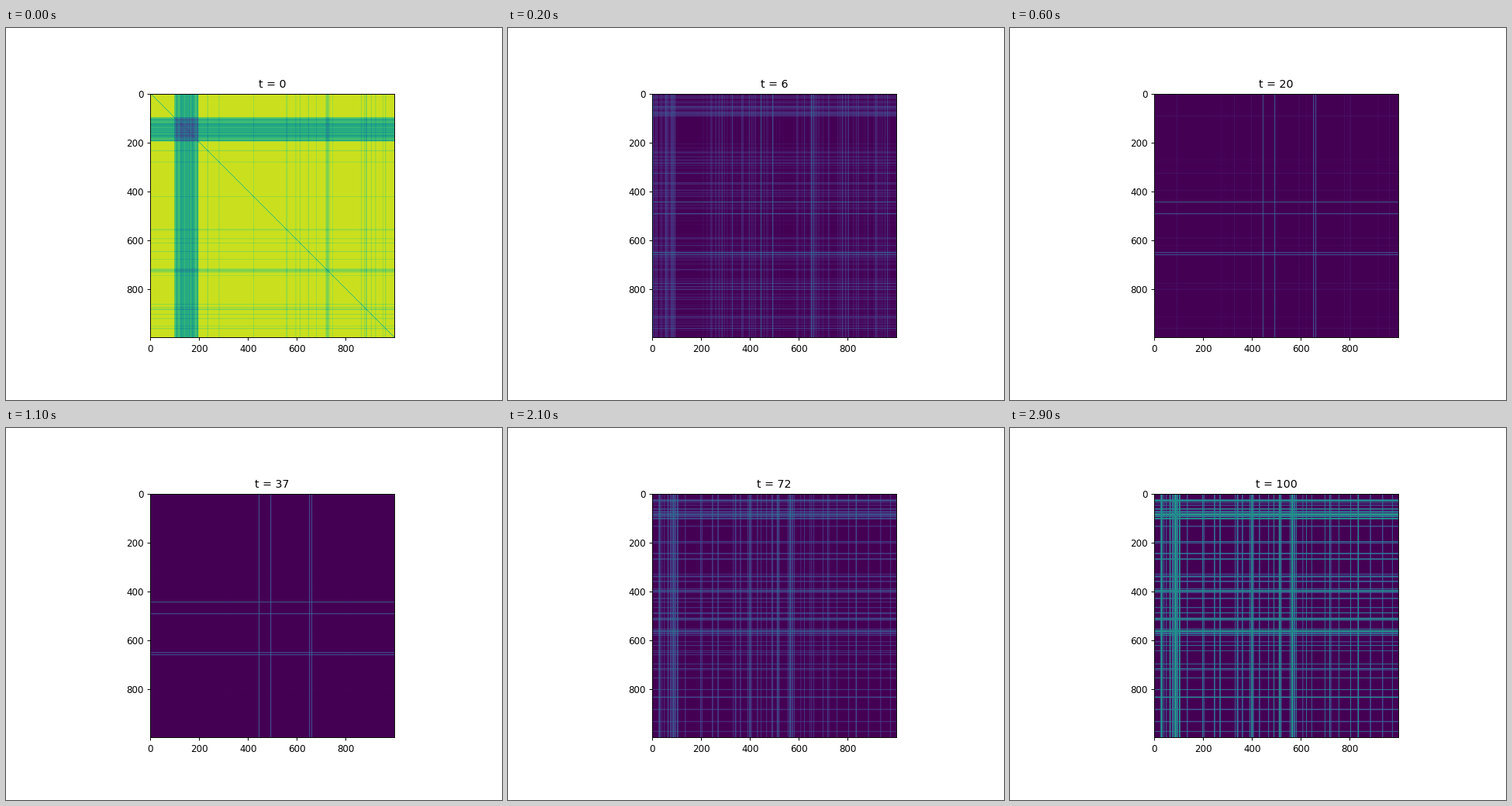
A matplotlib script that plays this animation: 640x480 px, repeating every 3000 ms.

```python
import numpy as np
import matplotlib.pyplot as plt
from matplotlib.animation import FuncAnimation

W, H, DPI = 640, 480, 100
N, FRAMES, INTERVAL = 1000, 30, 100
LEFT, BOTTOM, SIDE = 186.3, 80.7, 314.7  # axes box in pixels
SCALE = 0.853  # text and tick size relative to the defaults
cells = np.arange(N)
rng = np.random.default_rng(7)


def bump(centre, width):
    return np.exp(-((cells - centre) / width) ** 2)


def start_levels():
    """High everywhere, with a low block and a few sparse dips."""
    chance = 0.03 * (cells > 200) + 0.2 * bump(725, 12) + 0.1 * bump(285, 8)
    dips = rng.random(N) < chance
    vec = np.where(dips, rng.uniform(0.1, 0.3, N), 0.46)
    vec[100:197] = rng.uniform(0.0, 0.36, 97)
    return vec


def decay_times():
    """Most cells die out at once, a few last, four never fade."""
    scale = 1 + 1.2 * (cells < 100) + 0.4 * bump(250, 50) + 0.4 * bump(670, 30)
    tau = np.minimum(rng.exponential(scale), 6)
    lasting = rng.random(N) < 0.015 * scale
    tau[lasting] = rng.uniform(6, 14, lasting.sum())
    tau[100:200] = 0.5
    tau[[446, 494, 653, 662]] = np.inf
    return tau


def end_levels():
    """Thin lines that crowd together around a few centres."""
    chance = np.where(cells < 690, 0.04, 0.022)
    for centre, width, peak in [(28, 5, 0.3), (94, 18, 0.3), (375, 20, 0.08),
                                (400, 6, 0.6), (475, 9, 0.2), (515, 10, 0.15),
                                (562, 8, 0.4), (620, 8, 0.15), (836, 4, 0.4)]:
        chance = chance + peak * bump(centre, width)
    lines = (rng.random(N) < chance) * rng.uniform(0.4, 0.7, N)
    return np.maximum(lines, np.roll(lines, 1))


START, TAU, END = start_levels(), decay_times(), end_levels()


def matrix(t):
    if t == 0:
        grid = START[:, None] + START[None, :]
    else:
        ramp = np.clip((t - 64) / 18, 0, 1)
        fading = np.maximum(0.85 * np.exp(-t / TAU) - 0.02, 0)
        vec = fading * (1 - ramp) + END * ramp
        # chance that exactly one of the two cells is on
        grid = vec[:, None] + vec[None, :] - 2 * np.outer(vec, vec)
    np.fill_diagonal(grid, 0)
    return grid


fig = plt.figure(figsize=(W / DPI, H / DPI), dpi=DPI, facecolor="white")
ax = fig.add_axes([LEFT / W, BOTTOM / H, SIDE / W, SIDE / H])
image = ax.imshow(matrix(0), cmap="viridis", vmin=0, vmax=1, aspect="auto")
ax.set_xticks(range(0, N, 200))
ax.set_yticks(range(0, N, 200))
ax.tick_params(labelsize=10 * SCALE, length=3.5 * SCALE,
               width=0.8 * SCALE, pad=3.5 * SCALE)
for spine in ax.spines.values():
    spine.set_linewidth(0.8 * SCALE)
title = ax.set_title("t = 0", fontsize=12 * SCALE, pad=6 * SCALE)


def update(i):
    t = 100 * i // (FRAMES - 1)
    image.set_data(matrix(t))
    title.set_text(f"t = {t}")
    return image, title


anim = FuncAnimation(fig, update, frames=FRAMES, interval=INTERVAL,
                     repeat=True, repeat_delay=0, blit=False)
plt.show()
```
